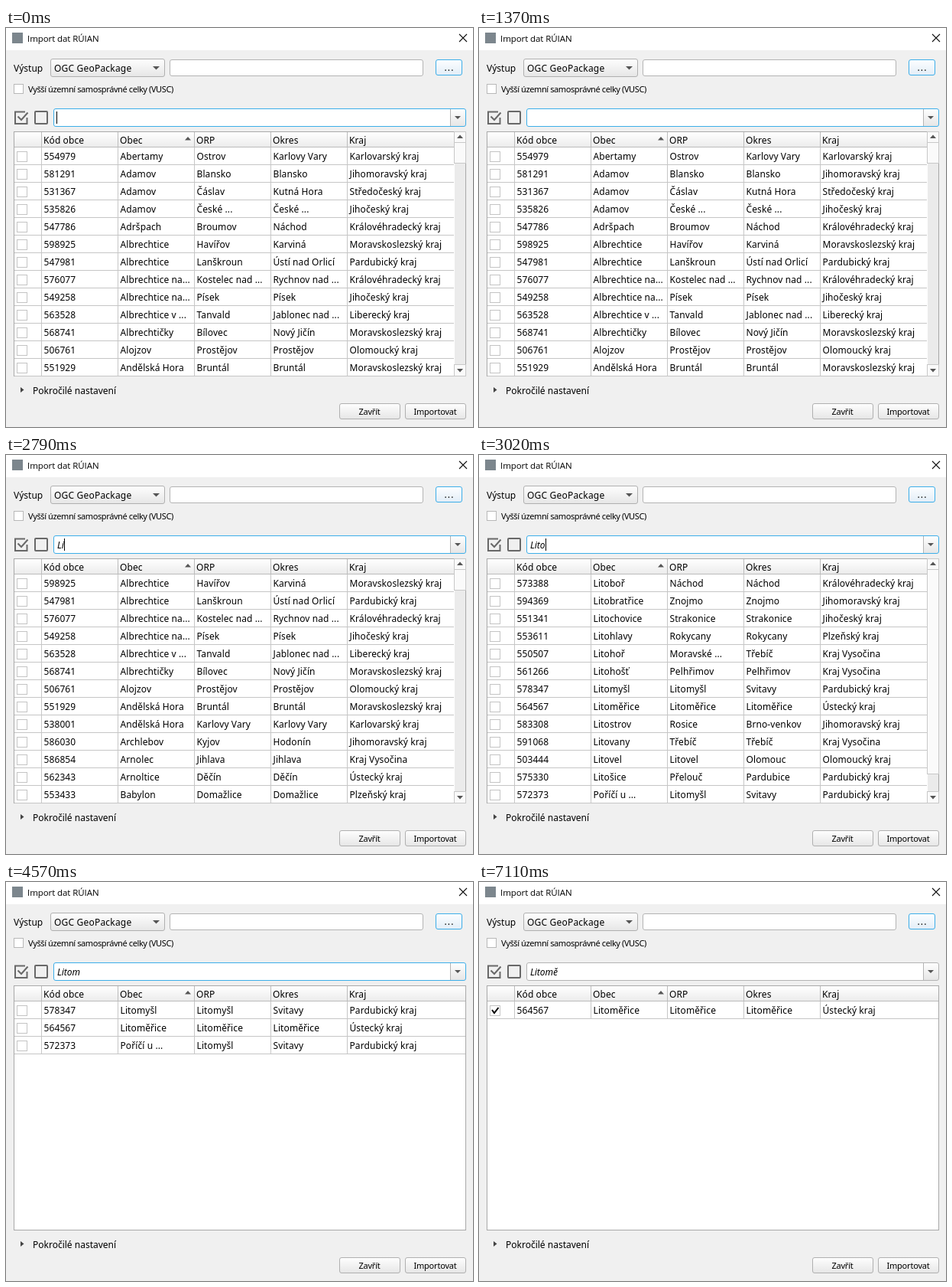
An HTML page for the animation above (8 s loop, 611 px wide and 521 px high).

```html
<!DOCTYPE html>
<html lang="cs">
<head>
<meta charset="utf-8">
<title>Import dat RÚIAN</title>
<style>
html, body { margin: 0; width: 100%; height: 100%; overflow: hidden; background: #f0f0f0; }
svg { display: block; font: 12px "Noto Sans", sans-serif; }
text { white-space: pre; }
#table { letter-spacing: .1px; }
.small { font-size: 11px; letter-spacing: -.4px; }
.button { font-size: 11px; letter-spacing: -.2px; text-anchor: middle; }
.title { font: 11.5px "Open Sans", sans-serif; letter-spacing: -.08px; }
.typed { font-style: italic; }
</style>
</head>
<body>
<svg width="611" height="521" viewBox="0 0 611 521">
  <defs>
    <linearGradient id="face" x2="0" y2="1"><stop stop-color="#fefefe"/><stop offset="1" stop-color="#e6e6e6"/></linearGradient>
    <linearGradient id="blue" x2="0" y2="1"><stop stop-color="#fdfeff"/><stop offset="1" stop-color="#e2edf7"/></linearGradient>
    <linearGradient id="head" x2="0" y2="1"><stop stop-color="#fff"/><stop offset="1" stop-color="#ececec"/></linearGradient>
  </defs>
  <rect width="611" height="521" fill="#f0f0f0"/>
  <rect width="611" height="29" fill="#fff"/>
  <rect x="8" y="6" width="14" height="14" fill="#7c868d"/>
  <text class="title" x="28" y="18">Import dat RÚIAN</text>
  <path d="M593 8l10 10m0-10l-10 10" stroke="#111" stroke-width="1.1"/>

  <text x="10" y="57">Výstup</text>
  <rect x="58.5" y="40.5" width="149" height="23" rx="2.5" fill="url(#face)" stroke="#b0b0b0"/>
  <text x="63" y="57" letter-spacing=".2">OGC GeoPackage</text>
  <path d="M192 50h9l-4.500 4.500z" fill="#555"/>
  <rect x="214.5" y="41.5" width="331" height="21" rx="2.5" fill="#fff" stroke="#b4b4b4"/>
  <rect x="562.5" y="41.5" width="34" height="20" rx="2.5" fill="url(#blue)" stroke="#3daee9"/>
  <text x="580" y="56" text-anchor="middle" letter-spacing="1.2">...</text>
  <rect x="10.5" y="73.5" width="12" height="12" fill="#fff" stroke="#b8b8b8"/>
  <text class="small" x="29" y="84">Vyšší územní samosprávné celky (VUSC)</text>

  <g fill="none" stroke="#686868" stroke-width="2">
    <path d="M25 109.500H12v15.500h15.500v-8"/>
    <path d="M15.500 115.500l4.500 4.500 8.500-9.500"/>
    <rect x="38" y="109" width="16" height="16" rx="1"/>
  </g>
  <rect x="62.5" y="105.5" width="539" height="23" rx="2.5" fill="#fff"/>
  <rect x="582" y="106" width="19" height="22" fill="url(#face)"/>
  <path d="M581.500 106v22" stroke="#b4b4b4"/>
  <rect id="field" x="62.5" y="105.5" width="539" height="23" rx="2.5" fill="none"/>
  <path d="M587 115h8l-4 4z" fill="#555"/>
  <text id="typed" class="typed" x="67" y="122"></text>
  <rect id="caret" y="109" width="1" height="16"/>

  <rect x="10.5" y="135.5" width="591" height="319" fill="#fff" stroke="#a9a9a9"/>
  <g id="table"></g>

  <path d="M19 469l4.500 3.500-4.500 3.500z" fill="#444"/>
  <text x="35" y="478">Pokročilé nastavení</text>
  <g fill="url(#face)" stroke="#b0b0b0">
    <rect x="436.5" y="490.5" width="79" height="20" rx="2.5"/>
    <rect x="522.5" y="490.5" width="79" height="20" rx="2.5"/>
  </g>
  <text class="button" x="475.5" y="505">Zavřít</text>
  <text class="button" x="561.5" y="505">Importovat</text>
</svg>
<script>
const parse = s => s.trim().split('\n').map(r => r.split('|'));

const places = parse(`
554979|Abertamy|Ostrov|Karlovy Vary|Karlovarský kraj
581291|Adamov|Blansko|Blansko|Jihomoravský kraj
531367|Adamov|Čáslav|Kutná Hora|Středočeský kraj
535826|Adamov|České ...|České ...|Jihočeský kraj
547786|Adršpach|Broumov|Náchod|Královéhradecký kraj
598925|Albrechtice|Havířov|Karviná|Moravskoslezský kraj
547981|Albrechtice|Lanškroun|Ústí nad Orlicí|Pardubický kraj
576077|Albrechtice na...|Kostelec nad ...|Rychnov nad ...|Královéhradecký kraj
549258|Albrechtice na...|Písek|Písek|Jihočeský kraj
563528|Albrechtice v ...|Tanvald|Jablonec nad ...|Liberecký kraj
568741|Albrechtičky|Bílovec|Nový Jičín|Moravskoslezský kraj
506761|Alojzov|Prostějov|Prostějov|Olomoucký kraj
551929|Andělská Hora|Bruntál|Bruntál|Moravskoslezský kraj
538001|Andělská Hora|Karlovy Vary|Karlovy Vary|Karlovarský kraj
586030|Archlebov|Kyjov|Hodonín|Jihomoravský kraj
586854|Arnolec|Jihlava|Jihlava|Kraj Vysočina
562343|Arnoltice|Děčín|Děčín|Ústecký kraj
553433|Babylon|Domažlice|Domažlice|Plzeňský kraj`);

const lito = parse(`
573388|Litoboř|Náchod|Náchod|Královéhradecký kraj
594369|Litobratřice|Znojmo|Znojmo|Jihomoravský kraj
551341|Litochovice|Strakonice|Strakonice|Jihočeský kraj
553611|Litohlavy|Rokycany|Rokycany|Plzeňský kraj
550507|Litohoř|Moravské ...|Třebíč|Kraj Vysočina
561266|Litohošť|Pelhřimov|Pelhřimov|Kraj Vysočina
578347|Litomyšl|Litomyšl|Svitavy|Pardubický kraj
564567|Litoměřice|Litoměřice|Litoměřice|Ústecký kraj
583308|Litostrov|Rosice|Brno-venkov|Jihomoravský kraj
591068|Litovany|Třebíč|Třebíč|Kraj Vysočina
503444|Litovel|Litovel|Olomouc|Olomoucký kraj
575330|Litošice|Přelouč|Pardubice|Pardubický kraj
572373|Poříčí u ...|Litomyšl|Svitavy|Pardubický kraj`);

const matching = word => lito.filter(r => r.join().includes(word));
const lists = {
  all: places.slice(0, 13), l: places.slice(5), lito,
  litom: matching('Litom'), litome: matching('Litomě')
};

// start ms, typed text, caret x (0 = hidden), list, row ticked
const steps = [
  [0, '', 66, 'all'], [320, '', 0, 'all'], [850, '', 66, 'all'],
  [1370, '', 0, 'all'], [1940, '', 66, 'all'],
  [2470, 'L', 72, 'l'], [2690, 'Li', 76, 'l'], [2840, 'Lit', 80, 'lito'],
  [2980, 'Lito', 87, 'lito'], [3540, 'Lito', 0, 'lito'],
  [3750, 'Litom', 97, 'litom'], [4470, 'Litom', 0, 'litom'], [4990, 'Litom', 97, 'litom'],
  [5190, 'Litomě', 104, 'litome'], [5760, 'Litomě', 0, 'litome'],
  [6290, 'Litomě', 104, 'litome'], [6840, 'Litomě', 0, 'litome'],
  [7060, 'Litomě', 0, 'litome', true]
];
const LOOP = 8000, TOP = 156, ROW = 23;
const columns = [46, 146, 246, 346, 446];
const heads = ['Kód obce', 'Obec', 'ORP', 'Okres', 'Kraj'];

const $ = id => document.getElementById(id);
const text = (x, y, s) => `<text x="${x}" y="${y}">${s}</text>`;
const path = (d, attrs) => `<path d="${d}" ${attrs}/>`;
const rect = (x, y, w, h, attrs) => `<rect x="${x}" y="${y}" width="${w}" height="${h}" ${attrs}/>`;

function scrollbar(thumb) {
  const edge = 'fill="#fafafa" stroke="#c8c8c8"';
  return rect(587, 136, 14, 318, 'fill="#ebebeb"') +
    rect(586.5, 135.5, 15, 14, edge) + rect(586.5, 439.5, 15, 15, edge) +
    rect(586.5, 149.5, 15, thumb, edge) +
    path('M590 144h8l-4-4.500z', 'fill="#555"') + path('M590 445h8l-4 4.500z', 'fill="#555"');
}

function drawTable(name, ticked) {
  const rows = lists[name], full = rows.length > 12;
  const right = full ? 586 : 601, bottom = TOP + ROW * rows.length;
  let out = rect(11, 136, right - 11, 19, 'fill="url(#head)"');
  let grid = '', headGrid = `M11 155.5H${right}`;
  columns.forEach((x, c) => {
    headGrid += `M${x + .5} 136v19`;
    grid += `M${x + .5} ${TOP}V${bottom}`;
    out += text(x + 3, 151, heads[c]);
  });
  rows.forEach((row, i) => {
    const y = TOP + ROW * i;
    grid += `M11 ${y + 22.5}H${right}`;
    out += rect(14.5, y + 5.5, 13, 13, 'fill="#fff" stroke="#c4c4c4"');
    row.forEach((s, c) => out += text(columns[c] + 3.5, y + 16, s));
  });
  out += path(grid, 'stroke="#c6c6c6"') + path(headGrid, 'stroke="#bcbcbc"') +
    path('M234 146.500h8l-4-4.500z', 'fill="#555"');
  if (ticked) out += path('M17 167l3 4 5.500-7', 'fill="none" stroke="#000" stroke-width="2"');
  if (full) out += scrollbar(name === 'lito' ? 267 : 27);
  $('table').innerHTML = out;
}

let current;
function show(step) {
  const [, typed, caret, list, ticked] = step;
  $('typed').textContent = typed;
  $('caret').setAttribute('x', caret);
  $('caret').setAttribute('visibility', caret ? 'visible' : 'hidden');
  $('field').setAttribute('stroke', ticked ? '#b4b4b4' : '#3daee9');
  if (!current || current[3] !== list || current[4] !== ticked) drawTable(list, ticked);
  current = step;
}

const start = performance.now();
function tick() {
  const t = (performance.now() - start) % LOOP;
  const step = steps.findLast(s => s[0] <= t);
  if (step !== current) show(step);
  requestAnimationFrame(tick);
}
tick();
</script>
</body>
</html>
```
